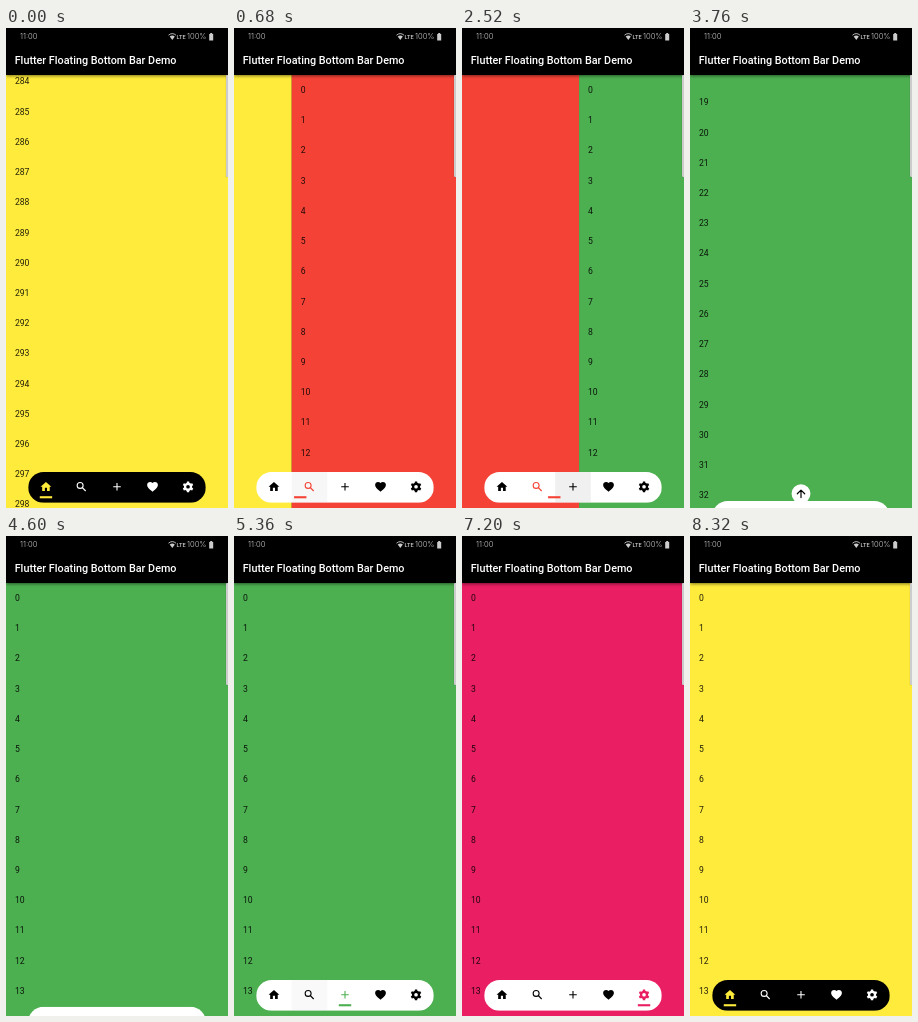
These frames come from a looping animation (222 by 480 pixels, 8.36 s). An HTML page:

```html
<!DOCTYPE html>
<html lang="en">
<head>
<meta charset="utf-8">
<style>
  html, body { margin: 0; width: 100%; height: 100%; overflow: hidden; background: #000; }
  #stage { position: relative; width: 222px; height: 480px; overflow: hidden; font-family: Roboto, sans-serif; }
  #body { position: absolute; left: 0; top: 47px; width: 222px; height: 433px; overflow: hidden; }
  .page { position: absolute; inset: 0; overflow: hidden; }
  .row { position: absolute; left: 8.9px; top: 0; height: 30.22px; line-height: 30.22px; font-size: 8.63px; color: rgba(0,0,0,.87); white-space: nowrap; }
  #head { position: absolute; left: 0; top: 0; width: 222px; height: 47px; background: #000; box-shadow: 0 1px 3px rgba(0,0,0,.5); color: #fff; }
  #head span { position: absolute; white-space: nowrap; line-height: 12px; color: #ccc; }
  #head .status { top: 3px; font: 300 7.6px/12px Inter, sans-serif; }
  #head .title { left: 8.7px; top: 27px; font-size: 10.8px; font-weight: 500; color: #fff; }
  #edge { position: absolute; right: 0; top: 47px; width: 1.6px; height: 102px; background: #ccc; border-radius: 1px 0 0 1px; box-shadow: 0 0 1px rgba(0,0,0,.4); }
  svg { position: absolute; left: 0; top: 0; }
</style>
</head>
<body>
<div id="stage">
  <div id="body"></div>
  <div id="head">
    <span class="status" style="left:14px">11:00</span>
    <span style="left:170.6px;top:3px;font-size:5.6px;font-weight:500">LTE</span>
    <span class="status" style="left:181px">100%</span>
    <span class="title">Flutter Floating Bottom Bar Demo</span>
    <svg width="222" height="47" fill="#ccc">
      <path d="M162.5 7.2Q166.3 4 170 7.2" fill="none" stroke="#ccc" stroke-width=".9"/>
      <path d="M163.7 8.6Q166.3 6.4 168.8 8.6L166.3 12Z"/>
      <path d="M204.2 5h2v1h1v6.5h-4V6h1z"/>
    </svg>
  </div>
  <div id="edge"></div>
  <svg width="222" height="480">
    <defs><clipPath id="pill"><rect x="22.2" y="444" width="177.6" height="30.8" rx="15.4"/></clipPath></defs>
    <g id="up">
      <circle r="9.45" fill="#fff"/>
      <path d="M0 3.8V-3.4M-3.7 0L0-3.7 3.7 0" fill="none" stroke="#000" stroke-width="1.2" stroke-linecap="round" stroke-linejoin="round"/>
    </g>
    <g id="bar">
      <g clip-path="url(#pill)">
        <rect id="back" x="22.2" y="444" width="177.6" height="30.8"/>
        <rect id="ink" y="444" width="35.52" height="30.8" fill="#bcbcbc"/>
      </g>
      <g id="icons"></g>
      <rect id="line" y="468.2" width="12.4" height="2.1"/>
    </g>
  </svg>
</div>
<script>
const $ = id => document.getElementById(id);
const LOOP = 8360, W = 222, ROW = 30.22, TAB = 35.52, BAR_X = 22.2;
const COLORS = ['#ffeb3b', '#f44336', '#4caf50', '#2196f3', '#e91e63'];
const SLIDE = 300;
// start, tab left, tab entered
const SLIDES = [[548, 0, 1], [2437, 1, 2], [5405, 2, 1], [6155, 1, 3], [6840, 3, 4], [7800, 4, 0]];
// ink strength relative to the start of a slide
const INK = [[-85, 0], [0, .2], [55, .26], [84, .23], [137, .11], [260, 0]];
const HIDE = 3075, SHOW = 4260, BAR_MS = 1000, TOP = 4280;

const clamp = x => Math.min(1, Math.max(0, x));
const decel = u => 1 - (1 - u) ** 2;
const bezier = (x1, y1, x2, y2) => x => {
  const at = (a, b, s) => 3 * a * s * (1 - s) ** 2 + 3 * b * s * s * (1 - s) + s ** 3;
  let lo = 0, hi = 1;
  for (let i = 0; i < 24; i++) {
    const mid = (lo + hi) / 2;
    if (at(x1, x2, mid) < x) lo = mid; else hi = mid;
  }
  return x <= 0 ? 0 : x >= 1 ? 1 : at(y1, y2, lo);
};
const ease = bezier(.25, .1, .25, 1), easeIn = bezier(.42, 0, 1, 1);

function lerpTable(table, x) {
  for (let i = 1; i < table.length; i++) {
    const [x0, y0] = table[i - 1], [x1, y1] = table[i];
    if (x >= x0 && x < x1) return y0 + (y1 - y0) * (x - x0) / (x1 - x0);
  }
  return 0;
}

const teeth = [0, 60, 120, 180, 240, 300].map(a =>
  `<path d="M10 2h4l.8 4.2H9.2z" fill="currentColor" transform="rotate(${a} 12 12)"/>`).join('');
const GLYPHS = [
  '<path fill="currentColor" d="M10 20v-6h4v6h5v-8h3L12 3 2 12h3v8z"/>',
  '<circle cx="9.5" cy="9.5" r="5.5" fill="none" stroke="currentColor" stroke-width="2"/><path d="M13.8 13.8l6 6" stroke="currentColor" stroke-width="2.1"/>',
  '<path fill="currentColor" d="M19 13h-6v6h-2v-6H5v-2h6V5h2v6h6z"/>',
  '<path fill="currentColor" d="M12 21.35l-1.45-1.32C5.4 15.36 2 12.28 2 8.5 2 5.42 4.42 3 7.5 3c1.74 0 3.41.81 4.5 2.09C13.09 3.81 14.76 3 16.5 3 19.58 3 22 5.42 22 8.5c0 3.78-3.4 6.86-8.55 11.54z"/>',
  '<circle cx="12" cy="12" r="5.5" fill="none" stroke="currentColor" stroke-width="4.2"/>' + teeth
];
$('icons').innerHTML = GLYPHS.map((g, i) =>
  `<g transform="translate(${BAR_X + TAB * (i + .5) - 6.48} 452.3) scale(.5396)">${g}</g>`).join('');
const icons = [...$('icons').children];

const pages = COLORS.map(color => {
  const el = document.createElement('div');
  el.className = 'page';
  el.style.background = color;
  const rows = Array.from({ length: 16 }, () => {
    const row = document.createElement('div');
    row.className = 'row';
    return el.appendChild(row);
  });
  $('body').append(el);
  return { el, rows };
});

function scrollOf(page, t) {
  if (page === 0 && t < 2000) return 8592 - 260 * decel(clamp(t / 560));
  if (page !== 2 || t < 3080) return 0;
  if (t < 3760) return 561 * (t - 3080) / 680;
  const far = 561 + 199 * decel(clamp((t - 3760) / 480));
  return far * (1 - easeIn(clamp((t - TOP) / 300)));
}

function placePage(i, x, t) {
  const { el, rows } = pages[i], off = scrollOf(i, t), first = Math.floor(off / ROW);
  el.style.display = 'block';
  el.style.transform = `translateX(${x}px)`;
  rows.forEach((row, k) => {
    row.textContent = first + k;
    row.style.transform = `translateY(${(first + k) * ROW - off}px)`;
  });
}

function draw(t) {
  const [start, from, to] = SLIDES.filter(s => s[0] <= t).pop() || [0, 0, 0];
  const p = ease(clamp((t - start) / SLIDE)), dir = Math.sign(to - from);
  const value = from + (to - from) * p, current = Math.round(value);

  pages.forEach(page => page.el.style.display = 'none');
  if (p < 1 || !dir) placePage(from, -dir * p * W, t);
  if (dir) placePage(to, dir * (1 - p) * W, t);

  const dark = current === 0;
  $('back').setAttribute('fill', dark ? '#000' : '#fff');
  icons.forEach((g, i) => g.style.color = i === current ? COLORS[i] : dark ? '#fff' : '#000');
  $('line').setAttribute('x', BAR_X + TAB * (value + .5) - 6.2);
  $('line').setAttribute('fill', COLORS[current]);

  const press = SLIDES.find(s => t >= s[0] - 85 && t < s[0] + 260);
  $('ink').setAttribute('opacity', press ? lerpTable(INK, t - press[0]) : 0);
  if (press) $('ink').setAttribute('x', BAR_X + TAB * press[2]);

  const away = t < SHOW ? clamp((t - HIDE) / BAR_MS) : 1 - clamp((t - SHOW) / BAR_MS);
  $('bar').setAttribute('transform', `translate(0 ${61.6 * away ** 2})`);

  const size = easeIn(clamp((t - HIDE) / 300)) * (1 - easeIn(clamp((t - SHOW) / 300)));
  $('up').setAttribute('transform', `translate(111 ${475.2 - 9.45 * size}) scale(${size})`);
}

const begin = performance.now();
function tick() {
  draw((performance.now() - begin) % LOOP);
  requestAnimationFrame(tick);
}
tick();
</script>
</body>
</html>
```
